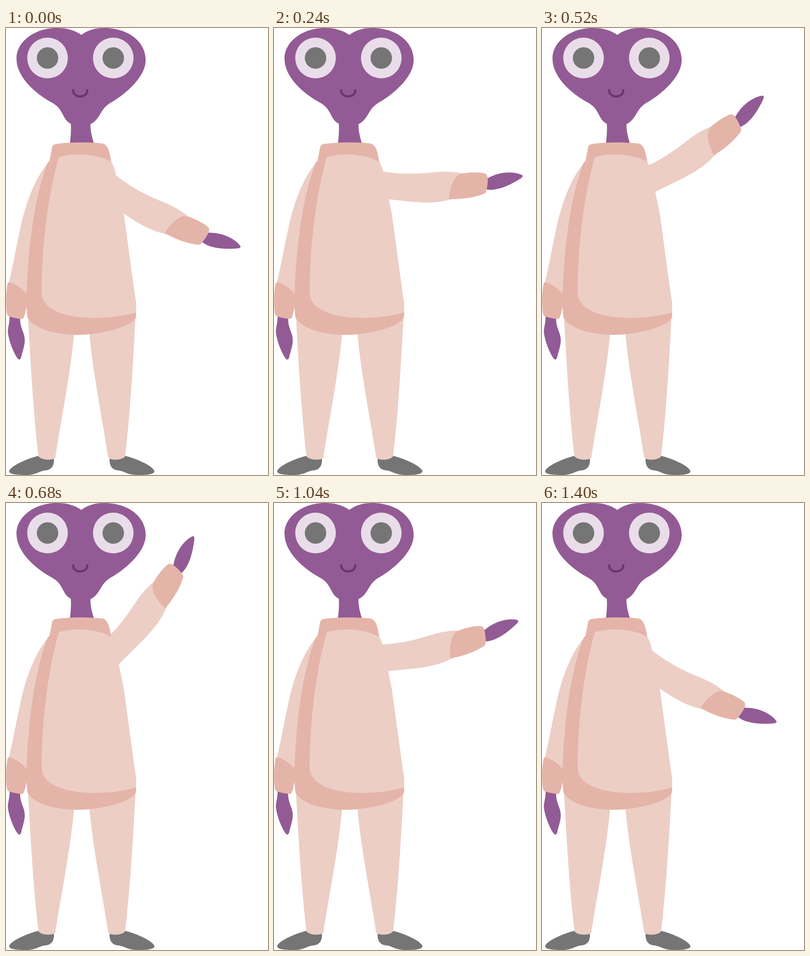
Recreate the animation shown at these times as an HTML page. Size 574 by 976 pixels, loop 1440 ms.

```html
<!DOCTYPE html>
<html lang="en">
<head>
<meta charset="utf-8">
<title>Waving alien</title>
<style>
  html, body { margin: 0; width: 100%; height: 100%; overflow: hidden; background: #fff; }
  svg { display: block; width: 100%; height: 100%; }
  .skin { fill: #935b95; }
  .cloth { fill: #eccec5; }
  .trim { fill: #e5b4a9; }
  .grey { fill: #757575; }
  .eye { fill: #e9dde9; }
  .mouth { fill: none; stroke: #6f356f; stroke-width: 5; stroke-linecap: round; }
</style>
</head>
<body>
<svg viewBox="0 0 574 976">
  <g id="leg">
    <path class="grey" d="M72 934C45 940 10 957 7 967C6 974 20 976 45 976C65 976 74 967 86 966C100 965 106 955 105 941Z"/>
    <path class="cloth" d="M48 625L149 660V669C142 750 120 860 108 938C105 944 78 945 71 935C60 840 54 740 48 625Z"/>
  </g>
  <use href="#leg" transform="matrix(-1 0 0 1 332 0)"/>

  <!-- waving arm, drawn in its lowest pose -->
  <g id="arm">
    <path class="skin" d="M440 446L446 447C480 447 506 464 514 477Q514 480 509 481C490 483 465 482 453 478C443 476 436 472 429 467Z"/>
    <path class="cloth" d="M225 309L240 321C268 343 297 360 330 374C358 386 375 392 400 412L354 450C322 446 290 427 258 405L208 371L200 340Z"/>
    <path class="trim" d="M348 447C360 427 376 414 388 411Q394 410 400 412C418 418 436 428 443 435Q447 438 444 446C440 455 433 465 428 470Q425 474 419 473C395 470 372 461 354 451Q347 450 348 447Z"/>
  </g>

  <!-- resting arm -->
  <path class="skin" d="M8 628C8 645 4 653 4 663C6 685 19 714 26 722Q30 727 33 720C36 706 42 692 41 680C41 665 30 655 31 632Z"/>
  <path class="cloth" d="M91 296C62 330 43 385 33 430C22 480 15 520 6 557L46 584L100 300Z"/>
  <path class="trim" d="M7 555C25 560 37 570 46 582V606C43 615 43 624 39 632Q37 636 32 635C24 634 16 633 8 630Q3 629 2 624C-1 600 0 580 3 560Q4 555 7 555Z"/>

  <path class="skin" d="M165 15C180 4 196 0 215 0C268 0 306 30 306 70C306 106 264 143 231 162C205 176 208 199 185 210C185 225 188 237 193 253H140C142 235 143 222 142 209C122 199 127 176 99 162C65 143 23 108 23 67C23 30 62 0 112 0C132 0 149 4 165 15Z"/>
  <g id="eye">
    <circle class="eye" cx="91" cy="65.5" r="44.5"/>
    <circle class="grey" cx="91" cy="65.5" r="23.5"/>
  </g>
  <use href="#eye" x="144"/>
  <path class="mouth" d="M147 136C147 154 178 154 178 136"/>

  <!-- jumper: dark trim below, light panel on top -->
  <path class="trim" d="M95 291L101 261Q102 254 110 253C145 249 180 249 211 252Q219 254 223 262C228 274 229 284 231 294L285 600V630C282 650 215 669 160 670C125 670 64 663 47 632Q44 612 45 580C49 460 66 360 90 297Q92 291 95 291Z"/>
  <path class="cloth" d="M116 282C130 278 148 276 160 276C192 276 220 285 231 293Q237 302 241 321L247 352L258 405L284 595L285 605L284.500 621C255 630 220 633 190 633C125 632 78 613 78 577C78 470 95 350 116 282Z"/>
</svg>
<script>
  const STEP = 40, STEPS = 36, PEAK = 17, SWING = 78.9;
  const arm = document.getElementById("arm");

  function draw(now) {
    const n = Math.floor(now / STEP) % STEPS;
    const lift = n < PEAK ? n / PEAK : (STEPS - 1 - n) / (STEPS - 1 - PEAK);
    arm.setAttribute("transform", `rotate(${-SWING * lift} 216 338)`);
    requestAnimationFrame(draw);
  }
  draw(0);
</script>
</body>
</html>
```
